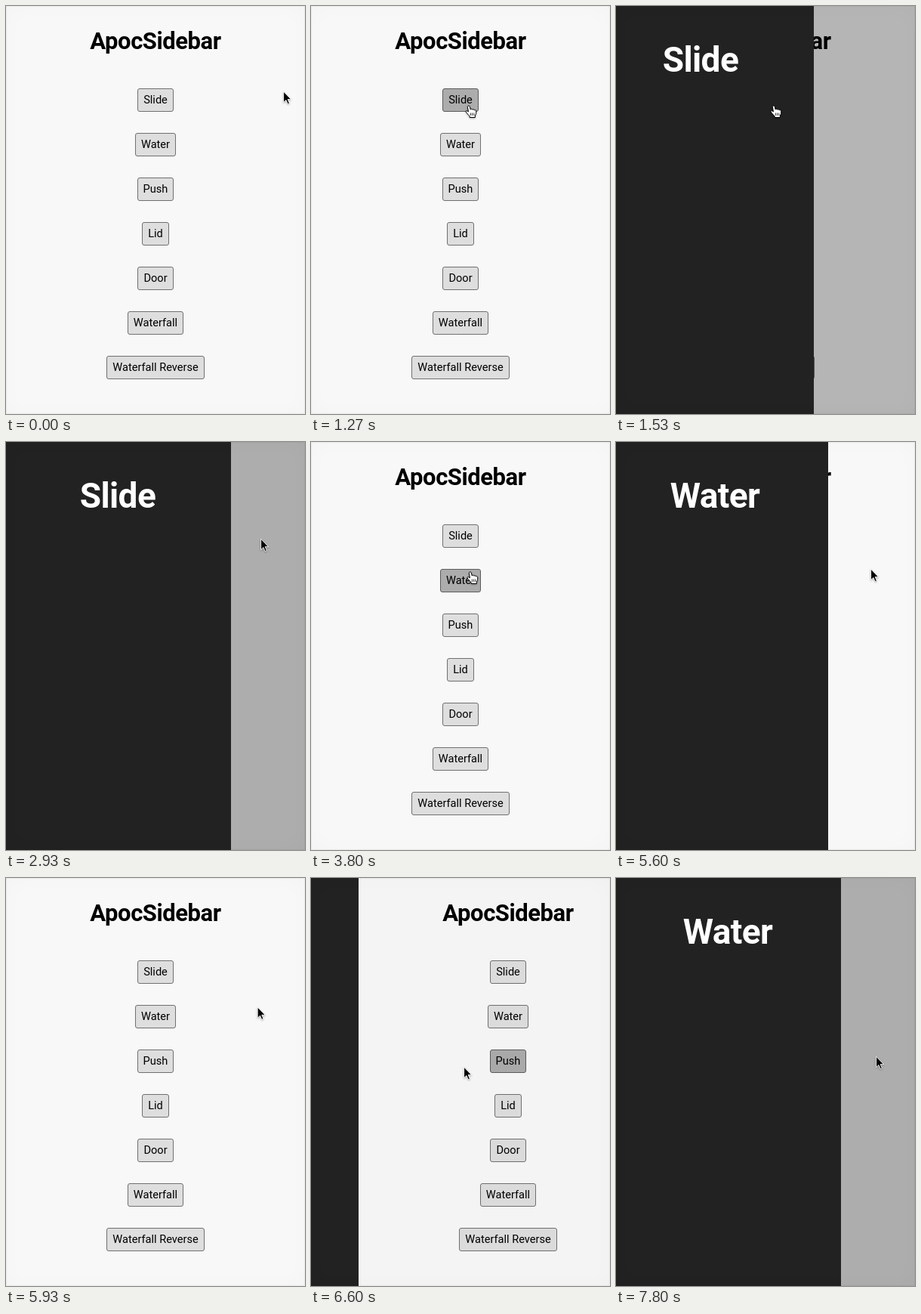
Animation, 396 px wide and 540 px high, one loop 8000 ms. Source, as an HTML page:

```html
<!DOCTYPE html>
<html lang="en">
<head>
<meta charset="utf-8">
<title>ApocSidebar</title>
<style>
  html, body { margin: 0; width: 100%; height: 100%; overflow: hidden; background: #f8f8f8; }
  svg { display: block; width: 100%; height: 100%; }
  text { font-family: Roboto, Inter, sans-serif; text-anchor: middle; }
  .title { font-size: 31px; font-weight: 700; letter-spacing: -.45px; }
  .label { font-size: 14.6px; }
  .btn rect { fill: #dedede; stroke: #707070; }
  .btn.hover rect { fill: #acacac; stroke: #5c5c5c; }
  #name { font-size: 46px; font-weight: 700; letter-spacing: -.6px; fill: #fff; }
  #frame { position: fixed; inset: 0; pointer-events: none;
    box-shadow: inset 0 0 0 1px rgba(0,0,0,.05), inset 0 0 28px rgba(0,0,0,.02); }
  #cursor { filter: drop-shadow(0 1px 1px rgba(0,0,0,.3)); }
</style>
</head>
<body>
<svg viewBox="0 0 396 540">
  <rect width="396" height="540" fill="#f8f8f8"/>
  <g id="page"><text class="title" x="198" y="57">ApocSidebar</text></g>
  <rect id="shade" width="396" height="540" opacity="0"/>
  <g id="bar">
    <path id="panel" fill="#222"/>
    <text id="name" x="148" y="87"></text>
  </g>
  <g id="cursor">
    <path id="arrow" transform="translate(-.4 .2) scale(.9)" d="M0 0V16L3.7 12.6 6.2 18.3 8.7 17.2 6.2 11.6H11.2Z" stroke="#fff"/>
    <g id="hand" stroke="#000" stroke-linejoin="round">
      <path fill="#fff" d="M-1.6 1.3C-1.3-.4 .8-.5 1.3 1.2L2.2 5C2.8 4 4.6 4.1 4.9 5.3 5.6 4.5 7.1 4.7 7.4 5.9 8.2 5.3 9.6 5.7 9.7 7.2 9.9 10 9.4 11.5 8.3 13V15.5H1.2V13.8C-.5 12.5-2.5 9.8-4 8-4.3 6.6-2.6 6-.6 8Z"/>
      <path fill="none" stroke-width=".8" d="M2.4 9.5V13M4.6 9.5V13M6.8 9.5V13"/>
    </g>
  </g>
</svg>
<div id="frame"></div>
<script>
const LOOP = 8000, WIDTH = 298, DUR = 250;
const $ = id => document.getElementById(id);

// label, button width
const buttons = [
  ['Slide', 48], ['Water', 54], ['Push', 48], ['Lid', 36],
  ['Door', 48], ['Waterfall', 74], ['Waterfall Reverse', 130]
].map(([label, w], i) => {
  const g = document.createElementNS('http://www.w3.org/2000/svg', 'g');
  const y = 109 + 59 * i;
  g.setAttribute('class', 'btn');
  g.innerHTML = `<rect x="${198 - w / 2 + .5}" y="${y + .5}" width="${w - 1}" height="30" rx="2.5"/>` +
    `<text class="label" x="198" y="${y + 20}">${label}</text>`;
  $('page').append(g);
  return g;
});

// from, to, x, y
const moves = [
  [0, 0, 368, 113], [70, 930, 209, 132], [1800, 2560, 338, 128],
  [3250, 3740, 211, 172], [4700, 5070, 338, 168],
  [5880, 6350, 203, 250], [7300, 7800, 345, 236]
];
// button, from, pointer until, highlighted until
const hovers = [[0, 780, 1850, 1850], [1, 3637, 4770, 4770], [2, 6237, 6575, LOOP]];
const sessions = [
  { name: 'Slide', open: 1383, close: 2960 },
  { name: 'Water', open: 4020, close: 5583, wave: true },
  { name: 'Water', open: 6560.3, close: Infinity, push: true }
];

const clamp = v => Math.min(1, Math.max(0, v));
const smooth = v => { v = clamp(v); return v * v * (3 - 2 * v); };
const bez = (a, b, u) => 3 * a * u * (1 - u) ** 2 + 3 * b * u * u * (1 - u) + u ** 3;

// CSS "ease"
function ease(x) {
  if (x <= 0) return 0;
  if (x >= 1) return 1;
  let lo = 0, hi = 1;
  for (let i = 0; i < 24; i++) {
    const mid = (lo + hi) / 2;
    if (bez(.25, .25, mid) < x) lo = mid; else hi = mid;
  }
  return bez(.1, 1, lo);
}

function cursorAt(t) {
  let [, , x, y] = moves[0];
  for (const [from, to, nx, ny] of moves.slice(1)) {
    const k = smooth((t - from) / (to - from));
    x += (nx - x) * k;
    y += (ny - y) * k;
  }
  return [x, y];
}

function drawSidebar(t) {
  const s = sessions.findLast(s => t >= s.open);
  if (!s) {
    $('bar').setAttribute('visibility', 'hidden');
    $('shade').setAttribute('opacity', 0);
    $('page').setAttribute('transform', 'translate(0 0)');
    return;
  }
  const k = (t - s.open) / DUR, closing = t >= s.close;
  const shown = closing ? 1 - ease((t - s.close) / DUR) : ease(k);
  const edge = Math.round(WIDTH * shown);
  // the wave's curved edge flattens after the panel arrives
  const r = s.wave ? 150 * (1 - clamp((t - s.open) / 445)) ** 1.2 : 0;
  const flat = WIDTH - r;
  $('panel').setAttribute('d', `M0 0H${flat}` +
    (r > .1 ? `A${r} 270 0 0 1 ${flat} 540` : 'V540') + 'H0Z');
  $('name').textContent = s.name;
  $('bar').setAttribute('visibility', shown > 0 ? 'visible' : 'hidden');
  $('bar').setAttribute('transform', `translate(${edge - WIDTH} 0)`);
  $('page').setAttribute('transform', `translate(${s.push ? edge : 0} 0)`);
  $('shade').setAttribute('opacity', closing ? 0 : .3 * smooth((k - .08) / .64));
}

function draw(t) {
  drawSidebar(t);
  buttons.forEach((b, i) => b.classList.toggle('hover',
    hovers.some(([n, from, , to]) => n === i && t >= from && t < to)));
  const [x, y] = cursorAt(t);
  const hand = hovers.some(([, from, to]) => t >= from && t < to);
  $('cursor').setAttribute('transform', `translate(${x} ${y})`);
  $('hand').setAttribute('visibility', hand ? 'visible' : 'hidden');
  $('arrow').setAttribute('visibility', hand ? 'hidden' : 'visible');
}

const start = performance.now();
function tick() {
  draw((performance.now() - start) % LOOP);
  requestAnimationFrame(tick);
}
draw(0);
requestAnimationFrame(tick);
</script>
</body>
</html>
```
